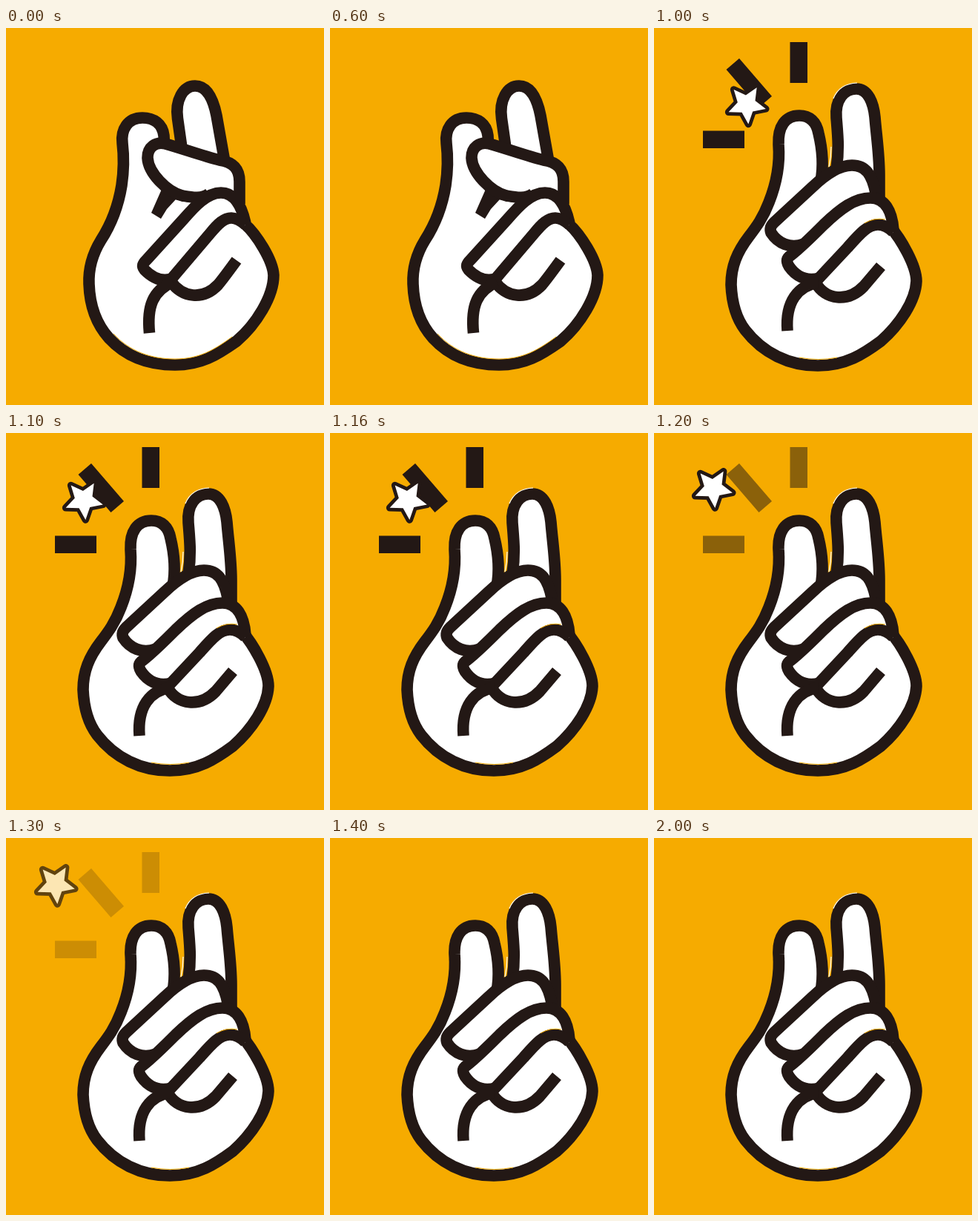
These frames come from a looping animation (429 by 508 pixels, 2400 ms). An HTML page:

```html
<!DOCTYPE html>
<html lang="en">
<head>
<meta charset="utf-8">
<title>Finger snap</title>
<style>
  html, body { margin: 0; width: 100%; height: 100%; overflow: hidden; background: #f6ab00; }
  svg { display: block; width: 100%; height: 100%; }
  .hand path { fill: #fff; stroke: #231815; stroke-width: 15.6; stroke-linejoin: round; }
  .hand .line { fill: none; }
  .hand .shade { fill: #231815; stroke: none; }
  .hand .glint { fill: none; stroke: #fff; stroke-width: 1.2; }
  .hand .rim { fill: none; stroke: #f6ab00; stroke-width: 1; }
  #rays { fill: #231815; }
  #star path { fill: #fff; stroke: #231815; stroke-width: 9.5; stroke-linejoin: round; paint-order: stroke; }
</style>
</head>
<body>
<svg viewBox="0 0 429 508">
  <g id="ready" class="hand">
    <!-- middle finger, palm, thumb edge -->
    <path d="M238 168 L231.5 122 C228 97 239 78 255 78 C272 78 280 98 284 118 L295 180"/>
    <path d="M208 165 C213 158 214 152 213 145 C211 129 199 121 184 121 C164 121 155 137 157 155 C159 172 159 192 156 212 C151 243 141 266 128 286 C117 304 111 322 112 345 C113 375 121 398 139 418 C162 443 192 454 228 454 C263 454 284 441 311 422 C337 400 361 362 361 333 C360 313 338 278 322 264"/>
    <path class="shade" d="M211 215 L196 249 L209 257 L217 244 L229 231 L246 235 L250 225z"/>
    <!-- folded fingers -->
    <path d="M274 223 C264 231 250 228 238 226 C217 221 192 195 191 175 C191 160 202 153 215 156 C240 163 264 172 288 178 C307 181 315 190 315 207 L315 237"/>
    <path d="M228 336 C212 344 198 337 187 326 C183 321 184 318 190 312 L240 257 C254 241 271 222 290 222 C308 222 318 240 323 263"/>
    <path d="M219 343 L276 276 C286 264 294 256 304 256 C311 256 317 260 323 265"/>
    <path class="line" d="M222 341 C238 364 266 367 286 346 Q292 339 311 313"/>
    <path class="line" d="M225 342 C198 354 190 375 193.500 411"/>
    <path class="rim" d="M145 412 C167 436 196 446 228 446 C260 446 281 434 305 416"/>
  </g>
  <g id="snapped" class="hand">
    <path d="M246 190 C250 163 248 146 246 121 C244 97 256 82 273 82 C289 82 296 101 298 120 C300 145 304 170 304 198 L304 228"/>
    <path d="M225 206 C229 185 227 163 222 142 C219 126 210 118 196 118 C177 118 167 133 168 157 C170 183 165 210 155 235 C147 256 138 268 128 281 C112 302 104 321 104 346 C105 369 110 390 123 407 C147 438 182 455 221 455 C259 455 283 439 306 422 C331 400 353 368 354 341 C354 320 333 284 318 267"/>
    <path d="M202 291 C184 298 167 290 158 276 C156 271 157 267 162 262 L214 214 C233 196 250 185 267 185 C286 185 294 198 299 222"/>
    <path d="M223 337 C205 342 191 334 182 321 C178 314 179 310 185 306 Q200 294 229 265 C252 243 271 229 292 229 C311 229 321 246 323 272"/>
    <path d="M216 344 L261 296 C277 278 288 265 302 265 C310 265 317 269 323 275"/>
    <path class="line" d="M218 343 C231 367 262 370 283 348 Q289 341 306 321"/>
    <path class="line" d="M222 343 C194 347 177 369 180 408"/>
    <path class="glint" d="M242 95 Q250 75 274 74 M236 187 Q239 174 239 160"/>
    <path class="rim" d="M284 263 Q298 255 312 258 M196 444 Q222 449 247 444"/>
  </g>
  <g id="rays">
    <path d="M183.500 19h23.500v55h-23.500z M66 138.500h56v23.500h-56z M97.500 56 L115 41 L159 92 L141.500 107z"/>
  </g>
  <g id="star"><path/></g>
</svg>
<script>
const LOOP = 2400, SNAP = 1000, STEP = 100;
const burst = [
  { x: 125, y: 103, star: 1, rays: 1 },
  { x: 105, y: 90.5, star: 1, rays: 1 },
  { x: 80, y: 74.5, star: 1, rays: 0.5 },
  { x: 67, y: 62.5, star: 0.7, rays: 0.2 }
];
const [ready, snapped, rays, star] =
  ['ready', 'snapped', 'rays', 'star'].map(id => document.getElementById(id));

function starPath(outer, inner, tilt) {
  const points = Array.from({ length: 10 }, (_, i) => {
    const r = i % 2 ? inner : outer;
    const a = (tilt + i * 36) * Math.PI / 180;
    return `${r * Math.cos(a)} ${r * Math.sin(a)}`;
  });
  return `M${points.join('L')}Z`;
}

function show(el, visible) {
  el.setAttribute('visibility', visible ? 'visible' : 'hidden');
}

function render(time) {
  const t = time % LOOP;
  const pose = burst[Math.floor((t - SNAP) / STEP)];
  show(ready, t < SNAP);
  show(snapped, t >= SNAP);
  show(rays, pose);
  show(star, pose);
  if (!pose) return;
  rays.setAttribute('opacity', pose.rays);
  star.setAttribute('opacity', pose.star);
  star.setAttribute('transform', `translate(${pose.x} ${pose.y})`);
}

star.firstElementChild.setAttribute('d', starPath(26.5, 12.5, 13));
const start = performance.now();
function tick() {
  render(performance.now() - start);
  requestAnimationFrame(tick);
}
tick();
</script>
</body>
</html>
```
